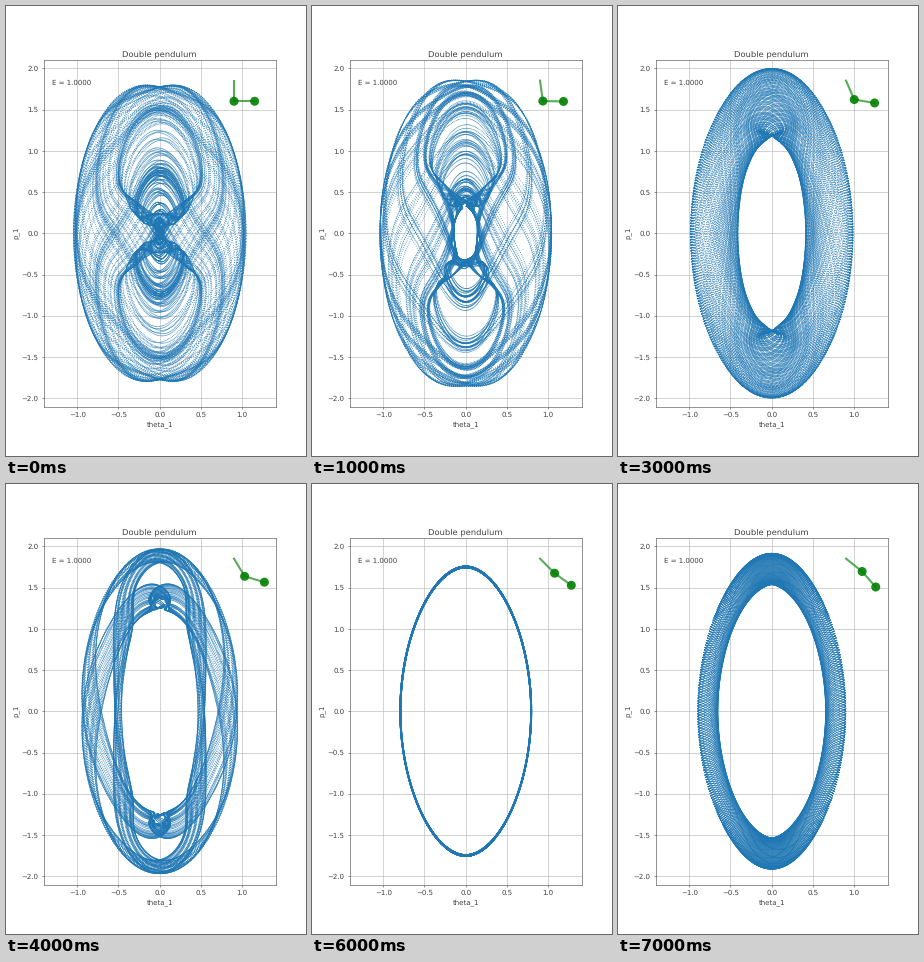
Animation, 300 px wide and 450 px high, one loop 8000 ms. Source, as a matplotlib script:

```python
import numpy as np
import matplotlib.pyplot as plt
from matplotlib.animation import FuncAnimation

FRAMES = 8
STEP = 0.04          # integration step in seconds
STEPS = 25000
PIVOT = np.array([0.9, 1.85])
ARM = 0.25
INK = "#404040"

plt.rcParams.update({
    "text.hinting": "no_hinting",
    "text.color": INK,
    "axes.labelcolor": INK,
    "axes.edgecolor": INK,
    "xtick.color": INK,
    "ytick.color": INK,
})


def start_angles():
    """Rest positions that all hold the energy E = 1."""
    t1 = 1.41 * np.sin(0.0985 * np.arange(FRAMES))
    return t1, np.arccos(2 - 2 * np.cos(t1))


def rates(y):
    """Hamilton's equations for unit masses, lengths and gravity."""
    t1, t2, p1, p2 = y
    d = t1 - t2
    s, c = np.sin(d), np.cos(d)
    den = 1 + s * s
    v1 = (p1 - p2 * c) / den
    v2 = (2 * p2 - p1 * c) / den
    twist = s * (p1 * p2 - (p1 * v1 + p2 * v2) * c) / den
    return np.array([v1, v2,
                     -twist - 2 * np.sin(t1),
                     twist - np.sin(t2)])


def trajectories(t1, t2):
    """Runge-Kutta orbits of (theta_1, p_1), with Hermite midpoints added."""
    y = np.array([t1, t2, 0 * t1, 0 * t1])
    pos = np.empty((STEPS, 2, FRAMES))
    vel = np.empty_like(pos)
    for i in range(STEPS):
        k1 = rates(y)
        pos[i], vel[i] = y[::2], k1[::2]
        k2 = rates(y + STEP / 2 * k1)
        k3 = rates(y + STEP / 2 * k2)
        k4 = rates(y + STEP * k3)
        y = y + STEP / 6 * (k1 + 2 * (k2 + k3) + k4)
    mid = (pos[:-1] + pos[1:]) / 2 + STEP / 8 * (vel[:-1] - vel[1:])
    return np.concatenate([pos, mid])


def dot_cloud(size, **style):
    """Dots at subpixel places; a single size would be rounded to pixels."""
    cloud = ax.scatter([], [], linewidths=0, **style)
    cloud.set_sizes(np.array([size, size]), fig.dpi)
    return cloud


theta1, theta2 = start_angles()
orbits = trajectories(theta1, theta2)

fig, ax = plt.subplots(figsize=(6, 9), dpi=50)
ax.set(xlim=(-1.409, 1.409), ylim=(-2.1, 2.1),
       title="Double pendulum", xlabel="theta_1", ylabel="p_1")
ax.grid(True)
ax.text(-1.3, 1.8, "E = 1.0000")

dots = dot_cloud(1.6, color="C0", zorder=2)
rods, = ax.plot([], [], "-", lw=3, color="g", alpha=0.65,
                solid_capstyle="projecting", zorder=3)
bobs = dot_cloud(169, color="g", alpha=0.9, zorder=4)


def draw(i):
    dots.set_offsets(orbits[:, :, i])
    angles = np.array([theta1[i], theta2[i]])
    arms = ARM * np.column_stack([np.sin(angles), -np.cos(angles)])
    joints = PIVOT + np.cumsum(arms, axis=0)
    rods.set_data(*np.vstack([PIVOT, joints]).T)
    bobs.set_offsets(joints)
    return dots, rods, bobs


anim = FuncAnimation(fig, draw, frames=FRAMES, interval=1000,
                     repeat=True, repeat_delay=0)
plt.show()
```
